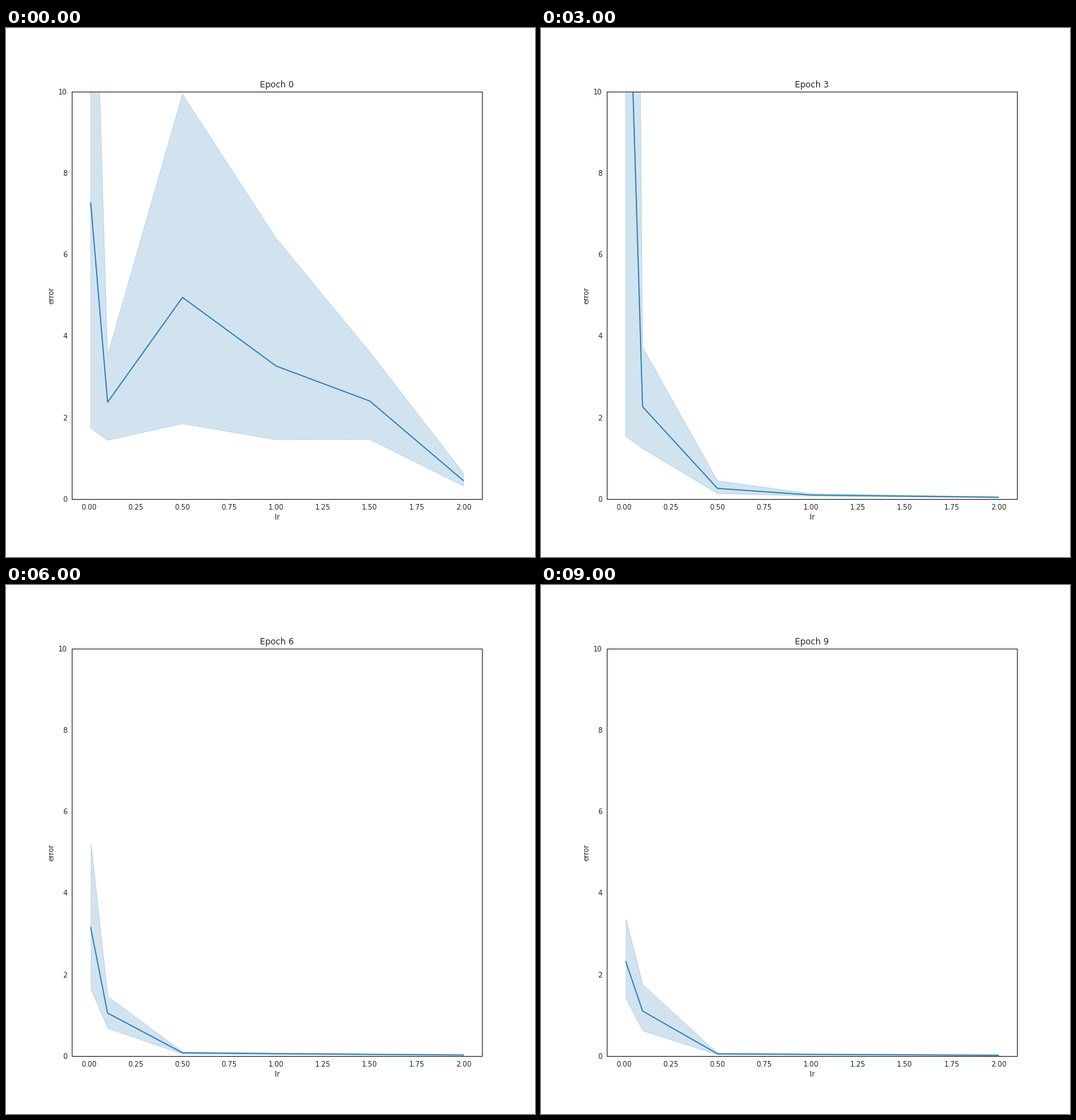
A matplotlib script that plays this animation: 748x748 px, repeating every 10 s.

```python
import matplotlib.pyplot as plt
import numpy as np
from matplotlib.animation import FuncAnimation

SIZE, DPI = 748, 72
EPOCHS = 10
INK = "0.15"
BLUE = "#1f77b4"

plt.rcParams.update({
    "font.family": "DejaVu Sans",
    "font.size": 10,
    "text.color": INK,
    "axes.labelcolor": INK,
    "axes.edgecolor": INK,
    "axes.linewidth": 1,
    "xtick.color": INK,
    "ytick.color": INK,
    "xtick.bottom": False,
    "ytick.left": False,
    "lines.solid_capstyle": "round",
})

LR = np.array([0.01, 0.1, 0.5, 1.0, 1.5, 2.0])

# The two small rates stay noisy: key values at a few epochs.
KEYS = [0, 1, 2, 4, 6, 7, 9]
TINY_MEAN = [7.27, 6.07, 49.7, 5.07, 3.15, 3.62, 2.32]
TINY_LOW = [1.74, 2.19, 1.62, 1.46, 1.64, 1.84, 1.42]
SMALL_MEAN = [2.37, 2.66, 1.25, 4.09, 1.05, 2.46, 1.1]
SMALL_HIGH = [3.52, 4.31, 1.69, 8.2, 1.46, 6.92, 1.75]

# The larger rates settle smoothly from their first-epoch values.
MEAN_START = np.array([4.945, 3.26, 2.40, 0.445])
LOW_START = np.array([1.845, 1.45, 1.46, 0.315])
HIGH_START = np.array([9.93, 6.39, 3.60, 0.63])
DECAY = np.array([1.17, 3.4, 3.4, 3.4])
REST = 0.6 - 0.225 * LR[2:]


def keyed(values, epoch):
    return np.exp(np.interp(epoch, KEYS, np.log(values)))


def settle(start, rest, epoch):
    return (start - rest) * np.exp(-DECAY * epoch) + rest / (epoch + 1)


def run(epoch):
    """Mean, lower and upper error at every learning rate."""
    tiny, small = keyed(TINY_MEAN, epoch), keyed(SMALL_MEAN, epoch)
    small_high = keyed(SMALL_HIGH, epoch)
    mean = [tiny, small, *settle(MEAN_START, REST, epoch)]
    low = [keyed(TINY_LOW, epoch), 0.9 * small ** 2 / small_high,
           *settle(LOW_START, 0.7 * REST, epoch)]
    high = [tiny ** 1.44, small_high,
            *settle(HIGH_START, 1.33 * REST, epoch)]
    return mean, low, high


fig, ax = plt.subplots(figsize=(SIZE / DPI, SIZE / DPI), dpi=DPI)
fig.subplots_adjust(left=0.1249, right=0.9, bottom=0.11, top=0.88)


def draw(epoch):
    ax.clear()
    mean, low, high = run(epoch)
    ax.plot(LR, mean, color=BLUE, lw=1.5)
    ax.fill_between(LR, low, high, color=BLUE, alpha=0.2, lw=1)
    margin = 0.05 * (LR[-1] - LR[0])
    ax.set(xlim=(LR[0] - margin, LR[-1] + margin), ylim=(0, 10),
           xlabel="lr", ylabel="error", title=f"Epoch {epoch}")
    return ax.get_children()


anim = FuncAnimation(fig, draw, frames=EPOCHS, init_func=lambda: draw(0),
                     interval=1000, repeat=True, repeat_delay=0)
plt.show()
```
